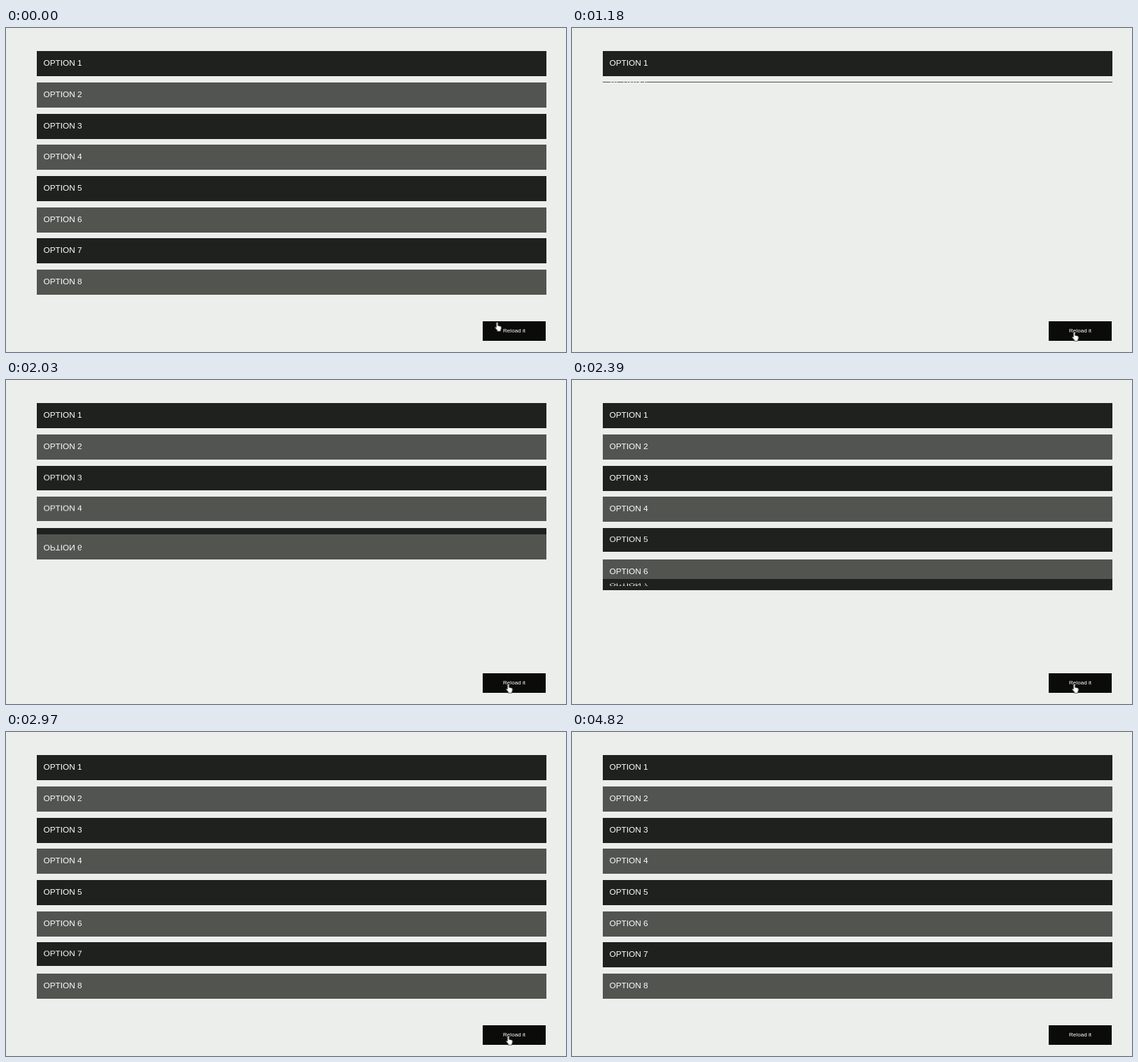
Write an HTML page that moves like this. It is 800 by 464 pixels and loops after 5.06 s.

```html
<!DOCTYPE html>
<html lang="en">
<head>
<meta charset="utf-8">
<title>Unfolding menu</title>
<style>
  html, body {
    margin: 0;
    width: 100%;
    height: 100%;
    overflow: hidden;
    background: #eceeeb;
    font-family: "Liberation Sans", Arial, sans-serif;
    color: #fff;
  }
  ul { margin: 0; padding: 0; list-style: none; }
  li {
    position: absolute;
    left: 43.5px;
    top: calc(33.4px + 44.64px * var(--i));
    width: 727.5px;
    height: 35.7px;
    padding-left: 9.5px;
    box-sizing: border-box;
    font-size: 11.8px;
    line-height: 35.7px;
    background: #1f211e;
    transform-origin: top;
  }
  li:nth-child(even) { background: #525450; }
  .reload {
    position: absolute;
    left: 681px;
    top: 420px;
    width: 90px;
    height: 28px;
    font-size: 8.1px;
    line-height: 28px;
    text-align: center;
    background: #0b0c09;
  }
  #cursor {
    position: absolute;
    left: 0;
    top: 0;
    width: 20px;
    height: 20px;
    overflow: visible;
    fill: #fff;
    stroke: #111;
    stroke-width: .6;
    stroke-linejoin: round;
  }
</style>
</head>
<body>
<ul id="menu"></ul>
<div class="reload">Reload it</div>
<svg id="cursor">
  <path id="hand" d="M0 .3q1.2 0 1.2 1.2V5.2l3.6.8q1.5.4 1.4 2 0 2.500-1.200 4V13.400H.2V12L-2.900 8.300Q-3.500 7-2.300 6.900L-1.100 8V1.500Q-1.100.3 0 .3Z"/>
  <path id="arrow" d="M0 0V10.200L2.300 8 3.900 11.700 5.400 11 3.900 7.500H7Z"/>
</svg>
<script>
  const LOOP = 5060, CLICK = 700, FIRST = 745, STAGGER = 250, FLIP = 1000;
  const byId = id => document.getElementById(id);

  // Each step: [time in ms, styles, easing towards the next step]
  function play(el, steps) {
    const frames = steps.map(([ms, styles, easing = 'linear']) =>
      ({ ...styles, offset: ms / LOOP, easing }));
    el.animate(frames, { duration: LOOP, iterations: Infinity });
  }

  const tilt = (deg, opacity = 1) => ({ transform: `rotateX(${deg}deg)`, opacity });
  const at = (x, y, opacity = 1) => ({ transform: `translate(${x}px, ${y}px)`, opacity });
  const seen = opacity => ({ opacity });

  for (let i = 0; i < 8; i++) {
    const item = document.createElement('li');
    item.textContent = `OPTION ${i + 1}`;
    item.style.setProperty('--i', i);
    byId('menu').append(item);
    const start = FIRST + i * STAGGER;
    play(item, [
      [0, tilt(0), 'step-end'],
      [CLICK, tilt(-180, 0), 'step-end'],
      [start, tilt(-180), 'ease'],
      [start + FLIP * 0.7, tilt(20), 'ease'],
      [start + FLIP, tilt(0)],
      [LOOP, tilt(0)]
    ]);
  }

  play(byId('cursor'), [
    [0, at(701.5, 421), 'ease-in-out'],
    [180, at(717.5, 435)],
    [3790, at(717.5, 435), 'ease-in-out'],
    [4150, at(461, 443)],
    [4270, at(461, 443), 'ease-in-out'],
    [4450, at(33, 443), 'step-end'],
    [4465, at(33, 443, 0)],
    [LOOP, at(33, 443, 0)]
  ]);

  // The pointer turns into an arrow once it leaves the button
  const LEAVE = 3885;
  play(byId('hand'), [[0, seen(1), 'step-end'], [LEAVE, seen(0)], [LOOP, seen(0)]]);
  play(byId('arrow'), [[0, seen(0), 'step-end'], [LEAVE, seen(1)], [LOOP, seen(1)]]);
</script>
</body>
</html>
```
